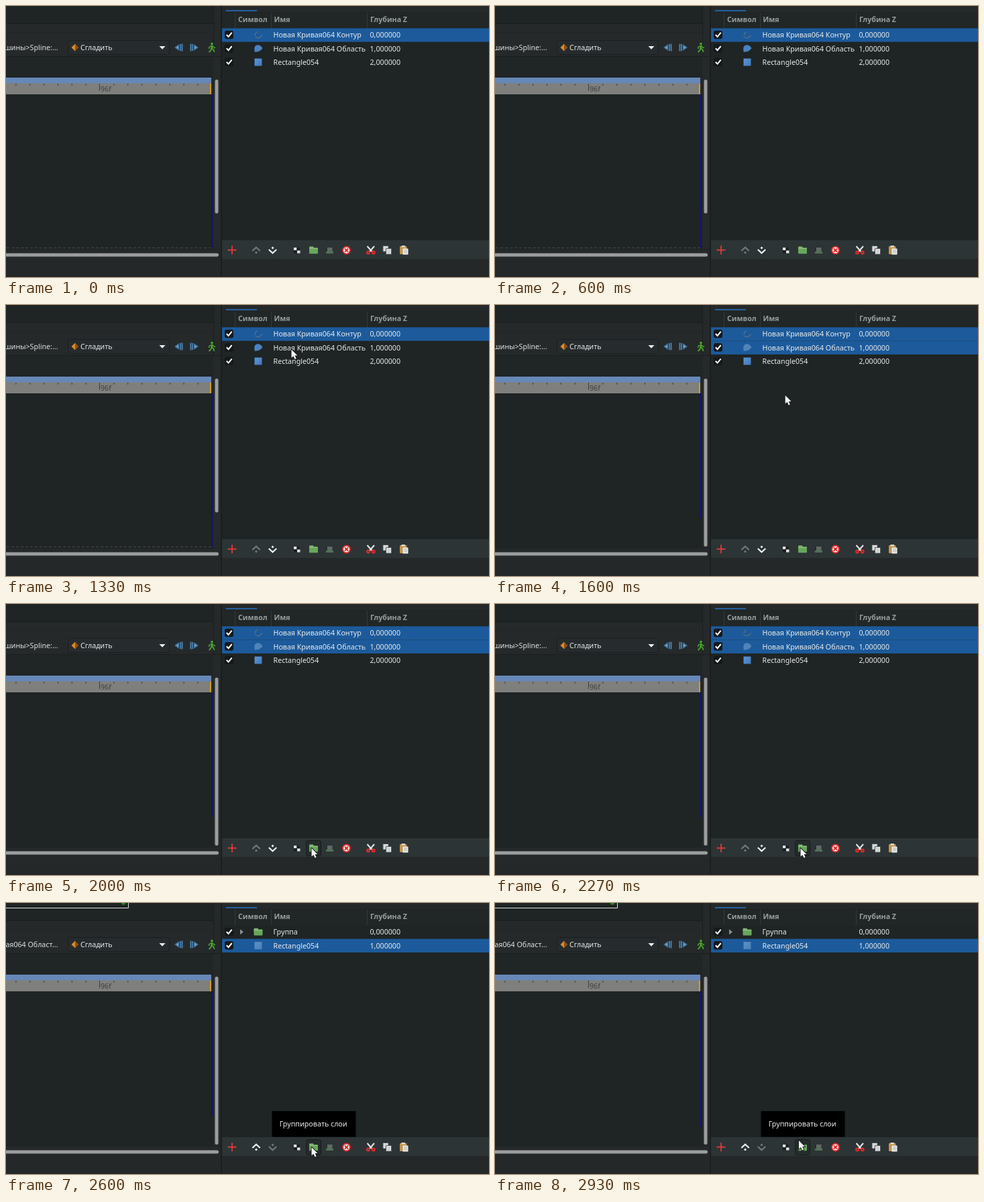
Write an HTML page with a canvas that moves like this. It is 720 by 405 pixels and loops after 2990 ms.

```html
<!DOCTYPE html>
<html lang="ru">
<head>
<meta charset="utf-8">
<style>
html, body { margin: 0; width: 100%; height: 100%; overflow: hidden; background: #23282a; }
canvas { display: block; width: 720px; height: 405px; }
</style>
</head>
<body>
<canvas id="stage" width="720" height="405"></canvas>
<script>
const ctx = document.getElementById('stage').getContext('2d');
const LOOP = 2990, STEP = 1000 / 15;
const SELECT = 1460, GROUP = 2325;
const FONT = '"Noto Sans", "Open Sans", sans-serif';
const DARK = '#1f2424', PANEL = '#25292a', BLUE = '#1c5a9b', EDGE = '#1a1e1f';

// time, x, y of the pointer tip
const PATH = [
  [1190, 330, 24], [1330, 425.5, 66.5],
  [1480, 426, 68], [1870, 455.5, 365], [2740, 455.5, 365], [2930, 453, 355]
];

function rect(x, y, w, h, fill) {
  ctx.fillStyle = fill;
  ctx.fillRect(x, y, w, h);
}

function box(x, y, w, h, r, fill, stroke) {
  ctx.beginPath();
  ctx.roundRect(x, y, w, h, r);
  if (fill) { ctx.fillStyle = fill; ctx.fill(); }
  if (stroke) { ctx.strokeStyle = stroke; ctx.lineWidth = 1; ctx.stroke(); }
}

function trace(pts) {
  ctx.beginPath();
  for (let i = 0; i < pts.length; i += 2) ctx.lineTo(pts[i], pts[i + 1]);
}

function poly(fill, ...pts) {
  trace(pts);
  ctx.closePath();
  ctx.fillStyle = fill;
  ctx.fill();
}

function line(color, width, ...pts) {
  trace(pts);
  ctx.strokeStyle = color;
  ctx.lineWidth = width;
  ctx.stroke();
}

function dot(x, y, r, fill) {
  ctx.beginPath();
  ctx.arc(x, y, r, 0, Math.PI * 2);
  ctx.fillStyle = fill;
  ctx.fill();
}

function text(str, x, y, color = '#e9ebeb', weight = 400, align = 'left') {
  ctx.font = `${weight} 10.67px ${FONT}`;
  ctx.textAlign = align;
  ctx.fillStyle = color;
  ctx.fillText(str, x, y);
}

function at(x, y, draw) {
  ctx.save();
  ctx.translate(x, y);
  draw();
  ctx.restore();
}

function pointer(t) {
  if (t < PATH[0][0]) return null;
  for (let i = 1; i < PATH.length; i++) {
    const [a, ax, ay] = PATH[i - 1], [b, bx, by] = PATH[i];
    if (t <= b) {
      const u = (t - a) / (b - a), e = u * u * (3 - 2 * u);
      return [ax + (bx - ax) * e, ay + (by - ay) * e];
    }
  }
  return PATH[PATH.length - 1].slice(1);
}

function cursor(x, y) {
  at(x, y, () => {
    trace([0, 0, 0, 12.5, 2.9, 9.9, 5, 14.6, 7.2, 13.6, 5.2, 9.1, 9, 9]);
    ctx.closePath();
    ctx.lineJoin = 'round';
    ctx.strokeStyle = '#15181a';
    ctx.lineWidth = 1.8;
    ctx.stroke();
    ctx.fillStyle = '#f4f4f4';
    ctx.fill();
  });
}

function folder(x, y) {
  box(x - 6.5, y - 5.5, 6.5, 5, 1, '#86bd78');
  box(x - 6.5, y - 3.7, 13, 9, 1, '#68a65b');
  rect(x - 6, y - 3.2, 12, 1.2, '#8cc27e');
}

function check(y) {
  box(326.5, y - 6, 12, 11.5, 2, '#15191b', '#15191b');
  line('#ffffff', 2, 328.8, y - .3, 331.6, y + 2.6, 336.7, y - 3.6);
}

function curveIcon(y) {
  at(376, y, () => {
    ctx.beginPath();
    ctx.moveTo(-4.5, 2.5);
    ctx.bezierCurveTo(-1, 6, 4, 4, 5.5, 0);
    ctx.moveTo(-5, 1);
    ctx.quadraticCurveTo(-4.5, -3, -1.5, -5);
    ctx.strokeStyle = '#5d7285';
    ctx.lineWidth = 1.2;
    ctx.stroke();
  });
}

function regionIcon(y, faded) {
  at(376, y, () => {
    ctx.beginPath();
    ctx.moveTo(-5.5, 4);
    ctx.quadraticCurveTo(-7, -3, -2.5, -5);
    ctx.quadraticCurveTo(3, -6.5, 6.5, -.5);
    ctx.quadraticCurveTo(3, 5.5, -5.5, 5);
    ctx.fillStyle = faded ? '#4f83b9' : '#4a82c2';
    ctx.fill();
  });
}

function rectIcon(y, faded) {
  const g = ctx.createLinearGradient(371, y - 5, 382, y + 6);
  g.addColorStop(0, faded ? '#5b8fc6' : '#5c95d5');
  g.addColorStop(1, faded ? '#4a80ba' : '#3f77b8');
  rect(370.5, y - 5.5, 11, 11, g);
}

function row(y, name, depth, icon, selected) {
  if (selected) rect(322, y - 10, 398, 20.3, BLUE);
  check(y);
  icon(y, selected);
  text(name, 398.5, y + 4);
  text(depth, 542.5, y + 4);
}

function keyIcon(x, dir) {
  at(x, 62, () => {
    ctx.scale(dir, 1);
    poly('#3d719d', -7, 0, 0, -5, 0, 5);
    poly('#6fa3cb', -4.5, 0, -1, -2.5, -1, 2.5);
    poly('#4d82ae', 1, -5, 5.5, -5.5, 5.5, 5.5, 1, 5);
    line('#223848', 1, 3.2, -5, 3.2, 5);
  });
}

function walker() {
  const c = '#4aa52c';
  dot(307, 56.6, 1.9, c);
  line(c, 2.6, 307, 59, 306.6, 64);
  line(c, 1.5, 306, 59.5, 303, 61.5, 302.5, 64);
  line(c, 1.5, 307.5, 59.5, 310, 62, 312, 62.5);
  line(c, 1.8, 306.5, 63, 305.5, 66, 302.5, 69);
  line(c, 1.8, 307, 63, 309.5, 65.5, 310.5, 69);
}

function leftPane(t) {
  const grouped = t >= GROUP, multi = t >= SELECT;
  rect(0, 0, 320, 405, PANEL);
  rect(0, 0, 309, 26, DARK);
  rect(0, 26, 309, 1, EDGE);
  rect(309, 0, 1, 76, EDGE);
  rect(0, 39, 309, 1, '#212526');
  rect(0, 75, 320, 1, EDGE);
  rect(0, 76, 309, 32, '#202526');

  if (grouped) {
    line('#dedfdf', 1, 0, 7.5, 182.5, 7.5, 182.5, 0);
    dot(175, -.5, 3.2, '#268b16');
  }

  text(grouped ? 'ая064 Област...' : 'шины>Spline:...', 77.5, 66, '#dfe1e1', 400, 'right');

  box(92.5, 51.5, 151, 21, 2, '#262b2d', '#1a1e20');
  poly('#dc8a28', 103, 56.5, 97.5, 62, 103, 67.5);
  poly('#8c4f17', 103, 56.5, 108.5, 62, 103, 67.5);
  text('Сгладить', 111, 66);
  poly('#eceeee', 228.5, 60, 237.5, 60, 233, 64.7);
  keyIcon(258, 1);
  keyIcon(280, -1);
  walker();

  // time ruler
  rect(0, 107, 306, 9, '#6688b8');
  rect(0, 115.5, 306, 16.5, '#7f7f7d');
  for (let i = -6; i <= 7; i++) {
    if (i) rect(139.5 + i * 20.85, 116, 1, 3, '#3b3c3c');
  }
  rect(139, 116, 1, 11, '#3b3c3c');
  text('96f', 141, 128, '#3f4141');
  rect(304, 116, 2, 16, '#d39b25');

  rect(0, 132, 309, 231, DARK);
  const end = !multi ? 362 : t < 2650 ? 318 : 334;
  rect(306, 132, 2, end - 132, '#11127c');
  if (!multi) {
    ctx.setLineDash([4, 3]);
    line('#454a4c', 1, 1, 361.5, 306, 361.5);
    ctx.setLineDash([]);
  }
  rect(0, 363, 320, 1, '#1f2324');
  box(311.5, 110, 5, multi ? 251 : 200, 2.5, '#9c9e9e');
  box(-6, 369.5, 323, 5, 2.5, '#9c9e9e');
  rect(0, 378, 320, 27, '#242829');
}

function chevron(x, dir, on) {
  const c = on ? '#f1f3f3' : '#747a7c';
  at(x, 365, () => {
    ctx.scale(1, dir);
    line(c, 2.1, -5.7, 1, 0, -4.3, 5.7, 1);
    poly(c, 0, 1.5, 2, 3.5, 0, 5.5, -2, 3.5);
  });
}

function toolbar(grouped, hover) {
  rect(322, 350, 398, 28, '#2d3435');
  line('#e33a3a', 1.8, 330.5, 364.7, 343.5, 364.7);
  line('#e33a3a', 1.8, 337, 358.2, 337, 371.2);
  chevron(373, 1, grouped);
  chevron(397.5, -1, !grouped);

  rect(429, 361, 4.5, 4, '#dfe1e1');
  rect(433.5, 361, 4, 4, '#1a1e1f');
  rect(429, 365, 4.5, 4.5, '#1a1e1f');
  rect(434, 365.5, 4.5, 4, '#dfe1e1');

  if (hover) box(447.5, 353.5, 22, 23, 3, '#262b2c', '#171b1c');
  folder(458.5, 365);

  rect(478.5, 361, 8, 6, '#5f6a64');
  rect(477, 367, 11, 3, '#4f7255');
  rect(477, 361, 1.5, 6, '#23292a');

  // delete
  dot(507.5, 365, 6.5, '#dc2a2a');
  dot(507.5, 365, 4.5, '#f6eeee');
  line('#dc2a2a', 1.9, 505, 362.5, 510, 367.5);
  line('#dc2a2a', 1.9, 510, 362.5, 505, 367.5);

  // cut
  line('#e2e4e4', 2, 538.5, 359, 545.5, 367);
  line('#e2e4e4', 2, 549, 359, 542, 367);
  for (const x of [540, 547.8]) {
    ctx.beginPath();
    ctx.arc(x, 368.5, 1.9, 0, Math.PI * 2);
    ctx.strokeStyle = '#dd2c2c';
    ctx.lineWidth = 2.1;
    ctx.stroke();
  }

  for (const [x, y] of [[562, 358.5], [566.5, 362.5]]) {
    box(x, y, 8, 8.5, .5, '#eceeee', '#4b5052');
    for (let i = 2; i < 7; i += 2) rect(x + 1.5, y + i, 5, .7, '#9ca0a1');
  }

  box(587, 359, 10.5, 12, 1, '#c0954f');
  rect(589.5, 358, 5.5, 2.5, '#d7d7d3');
  box(591.5, 362.5, 8, 9, .5, '#eeeeec');
  for (let i = 2; i < 7; i += 2) rect(593, 362.5 + i, 5, .7, '#979b9c');
}

function rightPane(t, hover) {
  const grouped = t >= GROUP;
  rect(320, 0, 2, 405, EDGE);
  rect(322, 0, 398, 10, PANEL);
  rect(328, 6, 46, 2, '#245e9f');
  rect(322, 9, 398, 341, DARK);
  rect(322, 10, 398, 23, '#212626');
  for (const x of [341, 395, 538]) rect(x, 10, 1, 23, '#34393a');
  text('Символ', 346, 24.3, '#999d9e', 700);
  text('Имя', 399.5, 24.3, '#999d9e', 700);
  text('Глубина Z', 543, 24.3, '#999d9e', 700);

  if (grouped) {
    row(43.3, 'Группа', '0,000000', y => {
      poly('#8a9092', 349, y - 4, 354, y, 349, y + 4);
      folder(376, y);
    }, false);
    row(63.6, 'Rectangle054', '1,000000', rectIcon, true);
  } else {
    row(43.3, 'Новая Кривая064 Контур', '0,000000', curveIcon, true);
    row(63.6, 'Новая Кривая064 Область', '1,000000', regionIcon, t >= SELECT);
    row(84, 'Rectangle054', '2,000000', rectIcon, false);
  }

  toolbar(grouped, hover);
  rect(322, 378, 398, 27, '#242829');
  if (grouped) {
    rect(396.5, 311, 125, 38.5, '#000000');
    text('Группировать слои', 407.7, 334, '#eeeeee');
  }
}

function draw(ms) {
  const t = Math.floor((ms % LOOP + 4) / STEP) * STEP;
  const p = pointer(t);
  leftPane(t);
  rightPane(t, !!p && p[1] > 353);
  if (p) cursor(p[0], p[1]);
}

const start = performance.now();
function tick() {
  draw(performance.now() - start);
  requestAnimationFrame(tick);
}
tick();
</script>
</body>
</html>
```
